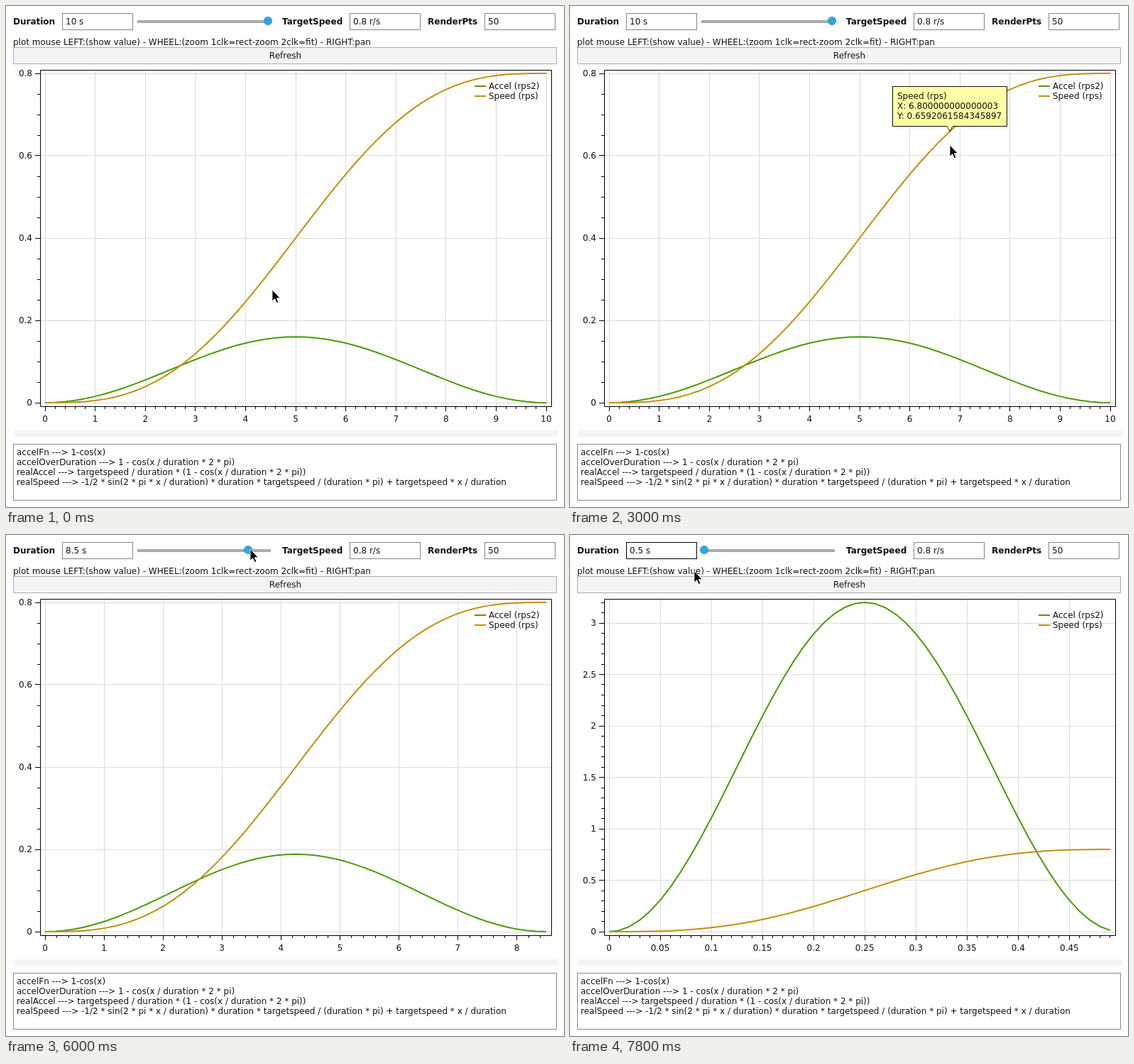
Recreate the animation shown at these times as an HTML page. Size 786 by 706 pixels, loop 8 s.

```html
<!DOCTYPE html>
<html lang="en">
<head>
<meta charset="utf-8">
<title>Speed ramp plot</title>
<style>
html, body { margin: 0; width: 100%; height: 100%; overflow: hidden; background: #fff; }
svg { display: block; width: 786px; height: 706px; }
text { font: 12px "DejaVu Sans", sans-serif; fill: #111; white-space: pre; }
.bold { font-weight: bold; }
.mid { text-anchor: middle; }
.end { text-anchor: end; }
.box { fill: #fff; stroke: #858585; }
.face { fill: #f4f4f4; }
.grid { stroke: #dadada; fill: none; }
.axis { stroke: #000; fill: none; }
.curve { fill: none; stroke-width: 2; stroke-linejoin: round; }
.accel { stroke: #4e9a06; }
.speed { stroke: #c0900c; }
.tip { fill: #ffffa2; fill-opacity: .94; stroke: #111; stroke-linejoin: round; }
</style>
</head>
<body>
<svg viewBox="0 0 786 706">
  <g id="controls"></g>
  <g id="plot"></g>
  <g id="tip"></g>
  <path id="cursor" d="M0 0V16L3.7 12.6L6.3 18.5L8.8 17.4L6.2 11.7H11.2Z" fill="#000" stroke="#fff" stroke-width=".8"/>
</svg>
<script>
const LOOP = 8000, TARGET = 0.8, STEPS = 50;
const LEFT = 55, WIDTH = 706, BOTTOM = 559, HEIGHT = 464;
const $ = id => document.getElementById(id);

// time, x, y
const pointer = [
  [0, 375, 400], [400, 375, 400], [1600, 402, 453], [2200, 411, 460], [2600, 411, 460],
  [2800, 470, 262], [3200, 600, 130], [3600, 784, 101], [4000, 784, 101],
  [4800, 332, 27], [5000, 366, 18], [5600, 371, 18], [5900, 344, 20], [6000, 344, 20],
  [7000, 185, 22], [7400, 180, 24], [7800, 175, 51]
];
// time, knob x
const knob = [[0, 369], [5600, 369], [5900, 341], [6000, 341], [7000, 259], [7600, 189]];

function track(keys, t, k) {
  const i = keys.findIndex(key => key[0] > t);
  if (i < 0) return keys[keys.length - 1][k];
  const a = keys[i - 1], b = keys[i];
  return a[k] + (b[k] - a[k]) * (t - a[0]) / (b[0] - a[0]);
}

const durationAt = t => 0.5 + Math.round((track(knob, t, 1) - 189) / 18.95 * 2) / 2;
const clamp = (v, lo, hi) => Math.max(lo, Math.min(hi, v));
const text = (x, y, s, cls = '') => `<text x="${x}" y="${y}" class="${cls}">${s}</text>`;
const rect = (x, y, w, h, cls, more = '') =>
  `<rect x="${x}" y="${y}" width="${w}" height="${h}" class="${cls}" ${more}/>`;
const path = (d, cls) => `<path d="${d}" class="${cls}"/>`;
const crisp = v => Math.floor(v) + 0.5;

function sample(d) {
  const count = d < 1 ? STEPS - 1 : STEPS, points = [];
  for (let i = 0, x = 0; i <= count; i++, x += d / STEPS) {
    const a = 2 * Math.PI * x / d;
    points.push({
      x,
      accel: TARGET / d * (1 - Math.cos(a)),
      speed: Math.min(TARGET * x / d - Math.sin(a) * TARGET / (2 * Math.PI), 0.7999999999999999)
    });
  }
  const xMax = points[count].x;
  const yMax = Math.max(TARGET, ...points.map(p => p.accel));
  return {
    points, xMax, yMax,
    px: x => LEFT + x / xMax * WIDTH,
    py: y => BOTTOM - y / yMax * HEIGHT
  };
}

// Smallest 1-2-5 step that keeps the number of intervals within a limit.
function tickStep(max, limit) {
  for (let p = 0.01; ; p *= 10)
    for (const [m, parts] of [[1, 5], [2, 4], [5, 5]])
      if (max / (m * p) <= limit + 1e-6) return { step: m * p, parts };
}

function axisTicks(max, limit, draw) {
  const { step, parts } = tickStep(max, limit);
  const minor = step / parts;
  for (let i = 0; i * minor <= max + 1e-6; i++)
    draw(i * minor, i % parts === 0);
}

function drawPlot(s) {
  let grid = '', ticks = '', labels = '';
  axisTicks(s.xMax, 10, (v, major) => {
    const x = crisp(s.px(v));
    ticks += `M${x} 565V${major ? 571 : 568}`;
    if (!major) return;
    grid += `M${x} 91V564`;
    labels += text(s.px(v), 586, +v.toFixed(2), 'mid');
  });
  axisTicks(s.yMax, 7, (v, major) => {
    const y = crisp(s.py(v));
    ticks += `M48 ${y}H${major ? 41 : 44}`;
    if (!major) return;
    grid += `M49 ${y}H768`;
    labels += text(37, Math.round(s.py(v)) + 4, +v.toFixed(2), 'end');
  });
  const line = key => path('M' + s.points.map(p =>
    s.px(p.x).toFixed(2) + ' ' + s.py(p[key]).toFixed(2)).join('L'), 'curve ' + key);
  $('plot').innerHTML = path(grid, 'grid') + line('accel') + line('speed') +
    path(ticks + 'M48.5 90.5H768.5V564.5H48.5Z', 'axis') + labels +
    path('M660 113H676', 'curve accel') + text(680, 117, 'Accel (rps2)') +
    path('M660 127H676', 'curve speed') + text(680, 131, 'Speed (rps)');
}

function drawTip(s, key, mouseX) {
  if (!key) { $('tip').innerHTML = ''; return; }
  const i = clamp(Math.round((mouseX - LEFT) / WIDTH * STEPS), 0, s.points.length - 1);
  const p = s.points[i], x = s.px(p.x), y = s.py(p[key]);
  const rows = [key === 'accel' ? 'Accel (rps2)' : 'Speed (rps)', 'X: ' + p.x, 'Y: ' + p[key]];
  const put = (l, t) => rows.map((r, n) => text(l + 7, t + 18 + 14 * n, r)).join('');
  $('tip').innerHTML = put(0, 0);
  const w = Math.round(Math.max(...[...$('tip').children].map(e => e.getComputedTextLength()))) + 14;
  const l = crisp(clamp(x - w / 2, 55, 756 - w)), r = l + w;
  const above = y - 63 >= 91;
  const t = crisp(above ? y - 63 : y + 4), b = t + 56;
  const base = clamp(x, l + 5, r - 5);
  let d;
  if (above) d = `M${l} ${t}H${r}V${b}H${base + 4}L${x} ${y}L${base - 4} ${b}H${l}Z`;
  else if (x > r) d = `M${l} ${t}H${r - 4}L${x} ${y}L${r} ${t + 4}V${b}H${l}Z`;
  else d = `M${l} ${t}H${base - 4}L${x} ${y}L${base + 4} ${t}H${r}V${b}H${l}Z`;
  $('tip').innerHTML = path(d, 'tip') + put(l - 0.5, t - 0.5);
}

function drawControls(t) {
  const field = (x, value, active) =>
    rect(x + 0.5, 10.5, 99, 23, 'box', active ? 'style="stroke:#000"' : '') + text(x + 5, 26, value);
  const notes = [
    'accelFn ---> 1-cos(x)',
    'accelOverDuration ---> 1 - cos(x / duration * 2 * pi)',
    'realAccel ---> targetspeed / duration * (1 - cos(x / duration * 2 * pi))',
    'realSpeed ---> -1/2 * sin(2 * pi * x / duration) * duration * targetspeed / (duration * pi) + targetspeed * x / duration'
  ];
  $('controls').innerHTML =
    text(10, 26, 'Duration', 'bold') + field(79, durationAt(t) + ' s', t >= 7600) +
    rect(185, 20, 188, 4, '', 'fill="#aaa"') +
    `<circle cx="${track(knob, t, 1)}" cy="21" r="5.7" fill="#30a5df" stroke="#2592c9" stroke-width=".7"/>` +
    text(389, 26, 'TargetSpeed', 'bold') + field(484, '0.8 r/s') +
    text(594, 26, 'RenderPts', 'bold') + field(674, '50') +
    text(10, 55, 'plot mouse LEFT:(show value) - WHEEL:(zoom 1clk=rect-zoom 2clk=fit) - RIGHT:pan') +
    rect(10.5, 58.5, 765, 23, 'face', 'stroke="#adadad"') + text(393.5, 74, 'Refresh', 'mid') +
    rect(12, 598, 766, 9, 'face') + rect(10.5, 617.5, 765, 79, 'box') +
    notes.map((n, i) => text(15, 633 + 14 * i, n)).join('');
}

function render(t) {
  const s = sample(durationAt(Math.max(0, t - 100)));
  const x = track(pointer, t, 1), y = track(pointer, t, 2);
  const key = t < 1600 || t >= 4000 ? '' : t < 2800 ? 'accel' : 'speed';
  drawControls(t);
  drawPlot(s);
  drawTip(s, key, x);
  $('cursor').setAttribute('transform', `translate(${x} ${y})`);
}

const start = performance.now();
let shown = -1;
function tick() {
  const now = (performance.now() - start) % LOOP;
  const t = now < 100 ? 0 : now < 400 ? 100 : Math.floor(now / 200) * 200;
  if (t !== shown) render(shown = t);
  requestAnimationFrame(tick);
}
tick();
</script>
</body>
</html>
```
